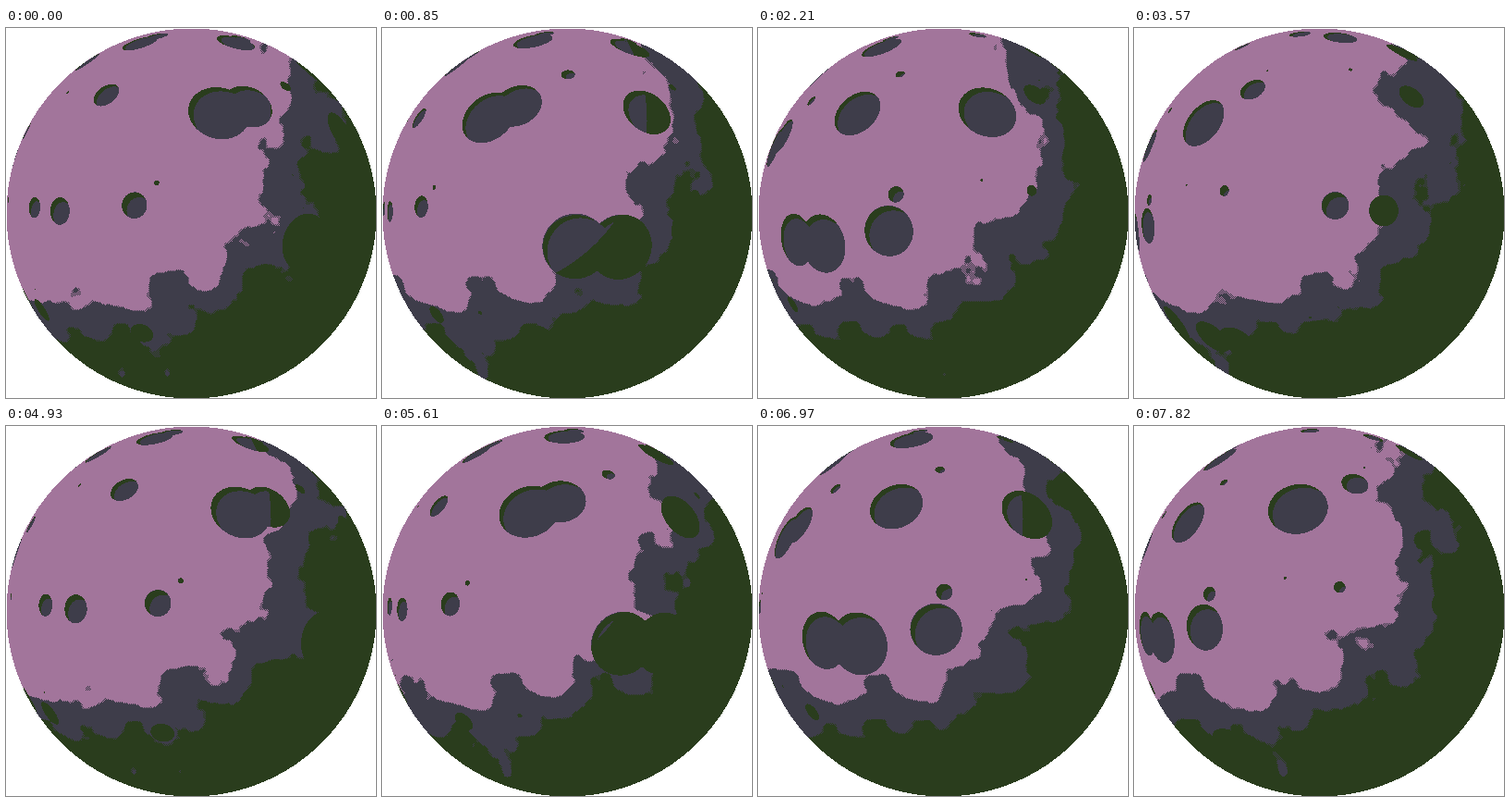
Animation of 400 by 400 pixels, one loop 7.99 s. Source, as an HTML page with a canvas:

```html
<!DOCTYPE html>
<html lang="en">
<head>
<meta charset="utf-8">
<title>Rotating moon</title>
<style>
  html, body { margin: 0; width: 100%; height: 100%; overflow: hidden; background: #fff; }
  canvas { display: block; width: 100vw; height: 100vh; image-rendering: pixelated; }
</style>
</head>
<body>
<canvas id="moon" width="400" height="400"></canvas>
<script>
const SIZE = 400;
const STEP_MS = 170, STEPS = 47, STEPS_PER_TURN = 30;
const SEED = 3.57;
const LIGHT = 0.25;
const GROUND_CELLS = 8, CRATER_CELLS = 5;
const MID_BORDER = 0.615, DARK_BORDER = 0.729, CRATER_BORDER = 0.465;
const DITHER_BAND = 2 / SIZE;

const rgb = (r, g, b) => (255 << 24 | b << 16 | g << 8 | r) >>> 0;
const LIT = rgb(162, 117, 155), MID = rgb(62, 61, 74), DARK = rgb(42, 61, 29);

const fract = v => v - Math.floor(v);

// Random values on a square lattice that wraps around.
function lattice(n) {
  return Float64Array.from({ length: n * n }, (_, i) =>
    fract(Math.sin((i % n) * 12.9898 + Math.floor(i / n) * 78.233) * 15.5453 * SEED));
}
const groundRand = lattice(GROUND_CELLS);
const craterRand = lattice(CRATER_CELLS);

function noise(x, y) {
  const ix = Math.floor(x), iy = Math.floor(y);
  const fx = x - ix, fy = y - iy;
  const x0 = ix & 7, x1 = (ix + 1) & 7;
  const y0 = (iy & 7) * 8, y1 = ((iy + 1) & 7) * 8;
  const u = fx * fx * (3 - 2 * fx), v = fy * fy * (3 - 2 * fy);
  const top = groundRand[y0 + x0] * (1 - u) + groundRand[y0 + x1] * u;
  const bottom = groundRand[y1 + x0] * (1 - u) + groundRand[y1 + x1] * u;
  return top + (bottom - top) * v;
}

function fbm(x, y) {
  let sum = 0;
  for (let scale = 0.5; scale > 0.05; scale /= 2) {
    sum += noise(x, y) * scale;
    x *= 2;
    y *= 2;
  }
  return sum;
}

// 0 inside a circle, 1 outside, one circle per cell.
function circleNoise(x, y) {
  const row = Math.floor(y);
  x += row * 0.31;
  const col = Math.floor(x);
  const h = craterRand[(row % CRATER_CELLS) * CRATER_CELLS + col % CRATER_CELLS];
  const centre = 0.25 + h * 0.5, r = h * 0.25;
  const dist = Math.hypot(x - col - centre, y - row - centre);
  if (dist >= r) return 1;
  if (dist <= 0.9 * r) return 0;
  const k = (dist - 0.9 * r) / (0.1 * r);
  return k * k * (3 - 2 * k);
}

const crater = (x, y) => 1 - circleNoise(x + 11, y + 11) * circleNoise(x + 12, y + 12);

// Everything about a pixel that does not depend on time.
const points = [];
for (let py = 0; py < SIZE; py++) {
  for (let px = 0; px < SIZE; px++) {
    const x = px / SIZE, y = py / SIZE;
    const radius = Math.hypot(x - 0.5, y - 0.5);
    if (radius > 0.49999) continue;
    const bulge = 1 + Math.sqrt(1 - 4 * radius * radius);
    const warp = fbm(x, y);
    points.push({
      index: py * SIZE + px,
      even: (px + py) % 2 === 0,
      light: Math.hypot(x - LIGHT, y - LIGHT),
      rim: (0.5 - radius) * 2,
      groundX: x * GROUND_CELLS + warp,
      groundY: y * GROUND_CELLS + warp,
      craterX: ((x - 0.5) / bulge + 0.5) * CRATER_CELLS,
      craterY: ((y - 0.5) / bulge + 0.5) * CRATER_CELLS
    });
  }
}

function groundColor(p, turn) {
  const shade = p.light + fbm(p.groundX + turn * GROUND_CELLS, p.groundY) * 0.3;
  const limit = border => border + (p.even ? DITHER_BAND : 0);
  if (shade > DARK_BORDER) return shade < limit(DARK_BORDER) ? MID : DARK;
  if (shade > MID_BORDER) return shade < limit(MID_BORDER) ? LIT : MID;
  return LIT;
}

const LIP = (LIGHT - 0.5) * 0.03 * CRATER_CELLS;

function colorAt(p, turn) {
  const x = p.craterX + turn * CRATER_CELLS, y = p.craterY;
  const depth = crater(x, y);
  if (depth < 0.5) return groundColor(p, turn);
  const shaded = p.light > CRATER_BORDER || crater(x + LIP, y + LIP) < depth - p.rim;
  return shaded ? DARK : MID;
}

const ctx = document.getElementById('moon').getContext('2d');
const image = ctx.createImageData(SIZE, SIZE);
const pixels = new Uint32Array(image.data.buffer).fill(rgb(255, 255, 255));
let shown = -1;

function draw(now) {
  const step = Math.floor(Math.max(now, 0) / STEP_MS) % STEPS;
  if (step !== shown) {
    shown = step;
    const turn = step / STEPS_PER_TURN;
    for (const p of points) pixels[p.index] = colorAt(p, turn);
    ctx.putImageData(image, 0, 0);
  }
  requestAnimationFrame(draw);
}

const start = performance.now();
const tick = () => draw(performance.now() - start);
function loop() {
  const step = Math.floor((performance.now() - start) / STEP_MS) % STEPS;
  if (step !== shown) render(step);
  requestAnimationFrame(loop);
}
function render(step) {
  shown = step;
  const turn = step / STEPS_PER_TURN;
  for (const p of points) pixels[p.index] = colorAt(p, turn);
  ctx.putImageData(image, 0, 0);
}
loop();
</script>
</body>
</html>
```
